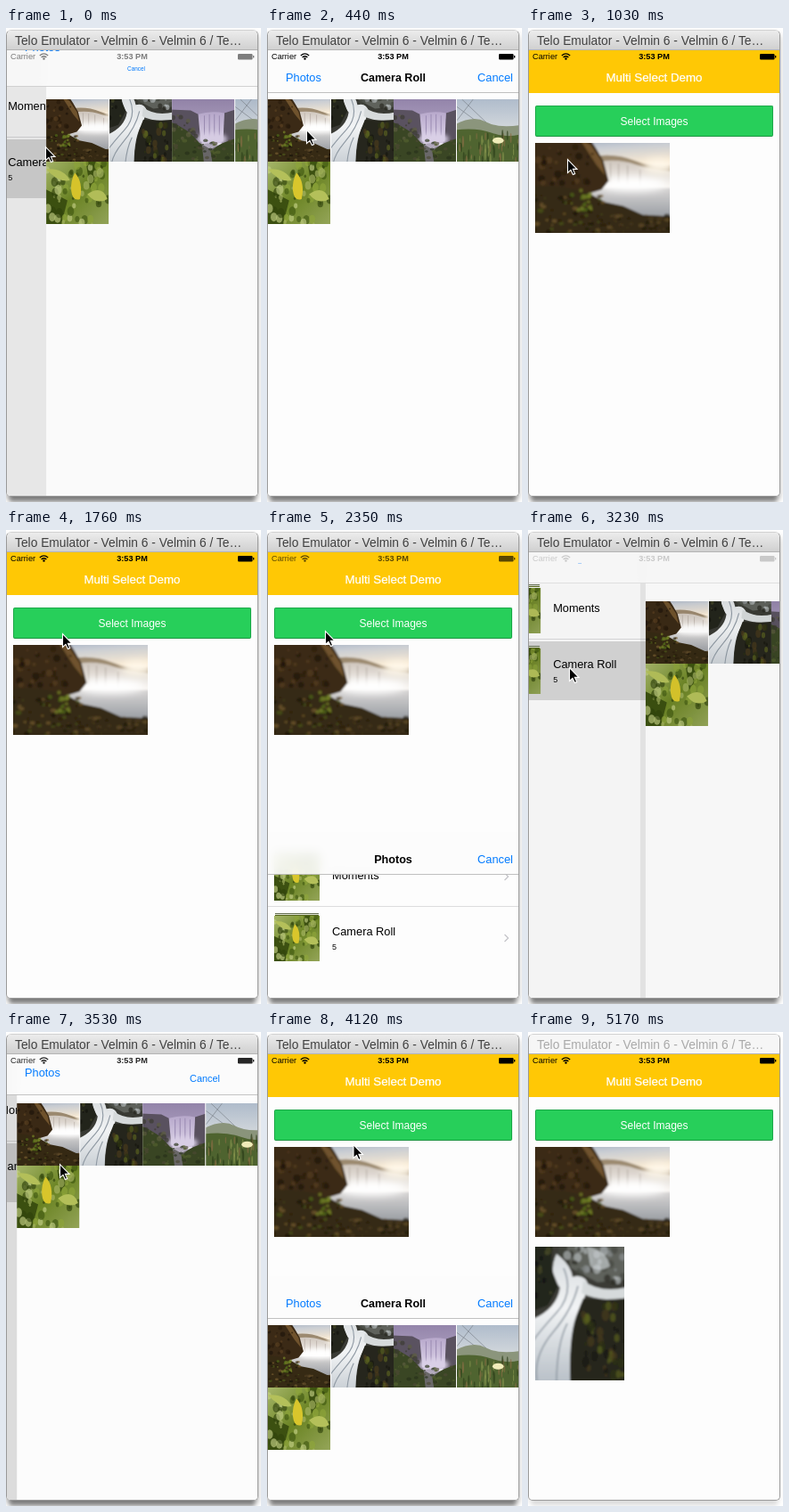
Animation, 286 px wide and 532 px high, one loop 6360 ms. Source, as an HTML page:

```html
<!DOCTYPE html>
<html lang="en">
<head>
<meta charset="utf-8">
<title>Multi select picker</title>
<style>
@property --y { syntax: "<length>"; inherits: true; initial-value: 0px; }
@property --cx { syntax: "<length>"; inherits: true; initial-value: 0px; }
@property --cy { syntax: "<length>"; inherits: true; initial-value: 0px; }
@property --push { syntax: "<number>"; inherits: true; initial-value: 0; }
@property --nav { syntax: "<number>"; inherits: true; initial-value: 1; }
@property --ink { syntax: "<number>"; inherits: true; initial-value: 1; }
@property --press { syntax: "<number>"; inherits: true; initial-value: 0; }
@property --one { syntax: "<number>"; inherits: true; initial-value: 0; }
@property --two { syntax: "<number>"; inherits: true; initial-value: 0; }
@property --active { syntax: "<number>"; inherits: true; initial-value: 1; }

/* Every value holds until the next stop that names it. */
@keyframes play {
  0% { --y: 0px; --push: .843; --nav: .5; --ink: .5; --press: 0; --one: 0; --two: 0; --active: 1; --cx: 44px; --cy: 133px; }
  2.2% { --push: .96; --nav: .85; --ink: .85; --cy: 124px; }
  4.55% { --push: 1; --nav: 1; --ink: 1; --cy: 116px; }
  6.91% { --cy: 114px; }
  11.63% { --y: 249px; }
  13.99% { --y: 440px; --cy: 130px; }
  16.19% { --y: 500px; --push: 0; --one: 1; --cy: 147px; }
  18.39% { --cy: 162px; }
  20.75% { --cx: 45px; --cy: 151px; }
  23.11% { --cx: 50px; --cy: 138px; }
  25.31% { --cx: 57px; --cy: 126px; }
  27.67% { --cx: 63px; --cy: 116px; }
  30.03% { --press: 1; --cx: 65px; --cy: 113px; }
  32.23% { --press: 0; }
  36.94% { --y: 314px; --ink: .65; }
  39.15% { --y: 100px; --ink: .85; }
  41.5% { --y: 20px; --ink: 1; --cx: 57px; --cy: 131px; }
  43.71% { --y: 0px; --cx: 48px; --cy: 150px; }
  46.06% { --cx: 46px; --cy: 154px; }
  50.78% { --push: .534; --nav: .1; --ink: .18; }
  52.98% { --push: .843; --nav: .5; --ink: .5; }
  55.34% { --push: .96; --nav: .85; --ink: .85; --cx: 60px; --cy: 148px; }
  57.7% { --push: 1; --nav: 1; --ink: 1; --cx: 82px; --cy: 135px; }
  60.2% { --cx: 96.5px; --cy: 126px; }
  64.77% { --y: 249px; }
  67.13% { --y: 440px; }
  69.49% { --y: 500px; }
  71.85% { --two: 1; }
  81.28% { --active: 0; }
}

html, body { margin: 0; width: 100%; height: 100%; overflow: hidden; background: #fff; }
#stage {
  position: absolute; left: 0; top: 0; width: 286px; height: 532px; overflow: hidden;
  font: 12.8px/20px "Liberation Sans", Arial, sans-serif; color: #000;
  animation: play 6360ms step-end infinite;
}
#stage div, #stage svg { position: absolute; white-space: nowrap; }
.full { inset: 0; }
.mid { left: 1px; width: 281px; text-align: center; }
.blue { color: #007aff; }
b { font-weight: 700; }

#window, #shadow { left: 0; top: 2px; width: 283px; height: 524px; border-radius: 6px 6px 5px 5px; }
#window {
  box-sizing: border-box; border: 1px solid #9a9a9a; border-top-color: #d2d2d2;
  background: #fdfdfd; overflow: hidden;
}
#shadow {
  box-shadow: 0 10px 5px -4px rgba(0, 0, 0, calc(.08 + var(--active) * .28)),
    0 4px 6px rgba(0, 0, 0, calc(.08 + var(--active) * .2));
}
#title {
  left: 0; top: 0; width: 281px; height: 21px; border-bottom: 1px solid #b4b4b4;
  background: linear-gradient(#ececec, #d0d0d0);
}
#fade { background: #f6f6f6; opacity: calc(1 - var(--active)); }
#name { left: 9px; top: 2px; font-size: 13.8px; color: #404040; opacity: calc(.42 + var(--active) * .58); }

#screen { clip-path: inset(25px 4px 7px 1px round 0 0 4px 4px); }
#head { left: 1px; top: 25px; width: 281px; height: 48px; background: #ffc805; }
#head + div { top: 46px; font-size: 13.3px; color: #fff; -webkit-text-stroke: .25px #fff; }
#button {
  left: 8px; top: 87px; width: 267px; height: 35px; box-sizing: border-box; border-radius: 2px;
  border: 1px solid #1fa84a; border-bottom-color: #1b9440; background: #27cf5a;
  font-size: 12px; line-height: 34px; text-align: center; color: #fff;
}
#button div { inset: 0; background: #000; opacity: calc(var(--press) * .16); }

#sheet { transform: translateY(var(--y)); clip-path: inset(25px 0 0); }
#list { background: #fdfdfd; transform: translateX(calc(var(--push) * -84px)); }
.row { left: 1px; width: 281px; height: 68px; }
.row .text { left: 72px; }
.rows { left: 0; top: calc(54px - var(--y) * .0446); width: 286px; height: 136px; }
.pick { left: -1px; top: 2px; width: 340px; height: 66px; background: #d9d9d9; opacity: calc(var(--push) * 50); }
.edge { left: 8px; top: 7px; width: 49px; height: 3px; background: linear-gradient(#8d9980, #2f3815 40%, #fff 45%, #55661c 70%); }
.arrow { left: 264px; top: 30px; }
#dim { background: #000; opacity: calc(var(--push) * var(--push) * var(--push) * var(--push) * .15); }
#grid { background: #fdfdfd; left: 1px; top: 0; width: 281px; height: 532px; transform: translateX(calc((1 - var(--push)) * 281px)); }
#strip { left: -6px; top: 0; width: 6px; height: 532px; background: #000; opacity: calc((.84 - var(--push)) * var(--push) * .42); }
#bar {
  left: 1px; top: 25px; width: 281px; height: calc(32px + var(--nav) * 15px);
  border-bottom: 1px solid rgba(0, 0, 0, calc(.08 + var(--nav) * .16));
  background: rgba(252, 252, 252, .9); backdrop-filter: blur(6px);
}
#veil { background: #000; opacity: calc((1 - var(--push)) * var(--push) * .1); }
.nav { top: 46px; }
#cancel {
  left: 216px; width: 80px; text-align: center;
  transform: translate(calc((var(--nav) - 1) * 220px), calc((var(--nav) - 1) * 20px)) scale(var(--nav));
}
#back { left: 21px; opacity: calc(var(--push) * 50); transform: translateY(calc((var(--nav) - 1) * 68px)); }
#photos { opacity: calc(1 - var(--push) * 50); font-size: 12.6px; }
#roll { opacity: calc((var(--push) - .98) * 50); font-size: 12.5px; }

#status { font-size: 9.2px; opacity: var(--ink); }
#status div { top: 22px; }
#cursor { left: 0; top: 0; transform: translate(var(--cx), var(--cy)); opacity: var(--active); overflow: visible; }
</style>
</head>
<body>
<svg width="0" height="0" style="position:absolute">
  <defs>
    <linearGradient id="dawn" x2=".2" y2="1"><stop stop-color="#8497b3"/><stop offset=".35" stop-color="#c9cdd3"/><stop offset=".7" stop-color="#f8e9d2"/></linearGradient>
    <linearGradient id="lake" x2="0" y2="1"><stop stop-color="#dfdcda"/><stop offset=".5" stop-color="#a3a6ab"/><stop offset="1" stop-color="#6d7479"/></linearGradient>
    <linearGradient id="foam" x2="0" y2="1"><stop stop-color="#cfc6bd"/><stop offset="1" stop-color="#fbf9f6"/></linearGradient>
    <linearGradient id="silk" x2="0" y2="1"><stop stop-color="#d6dadd"/><stop offset=".4" stop-color="#f2f4f5"/><stop offset="1" stop-color="#b4bcc4"/></linearGradient>
    <linearGradient id="dusk" x2="0" y2="1"><stop stop-color="#8f80a6"/><stop offset="1" stop-color="#b9accb"/></linearGradient>
    <linearGradient id="veilfall" x2="0" y2="1"><stop stop-color="#b8a9cc"/><stop offset="1" stop-color="#dcd3e8"/></linearGradient>
    <linearGradient id="haze" x2="0" y2="1"><stop stop-color="#a9b7c9"/><stop offset="1" stop-color="#dcdfe0"/></linearGradient>
    <linearGradient id="leaf" x2="1" y2="1"><stop stop-color="#b1bf76"/><stop offset=".5" stop-color="#6b8424"/><stop offset="1" stop-color="#9cab62"/></linearGradient>
    <filter id="soft"><feGaussianBlur stdDeviation=".9"/></filter>
    <filter id="mist" x="-.3" y="-.6" width="1.6" height="2.2"><feGaussianBlur stdDeviation="4"/></filter>

    <g id="falls" filter="url(#soft)">
      <path fill="url(#dawn)" d="M-9-9H159V45H-9Z"/>
      <path fill="url(#lake)" d="M-9 46H159V109H-9Z"/>
      <path fill="#9c8a70" d="M72 14Q92 12 112 20T159 24V34L110 28 72 30Z"/>
      <path fill="url(#foam)" d="M76 20Q96 18 112 24T159 32V50H72Z"/>
      <path stroke="#b3aaa2" d="M84 22V44M93 23V44M103 25V46M117 30V48"/>
      <ellipse cx="108" cy="46" rx="38" ry="8" fill="#fff" filter="url(#mist)"/>
      <ellipse cx="138" cy="26" rx="18" ry="8" fill="#fff8ea" filter="url(#mist)"/>
      <path fill="#3b2a16" d="M-9-9H58L68 6 76 20 82 42 74 52 40 62-9 60Z"/>
      <path fill="#70532d" d="M50-4L62 2 74 20 78 36 68 24Z"/>
      <path fill="#362a14" d="M-9 48Q30 46 58 55L78 66 98 70 120 80 159 82V109H-9Z"/>
      <g id="moss"/>
    </g>

    <g id="stream" filter="url(#soft)">
      <path fill="#3a3b35" d="M-9-9H109V159H-9Z"/>
      <path fill="#5f625c" d="M34-9H109V36L70 40 40 24Z"/>
      <g id="crags"/>
      <path fill="url(#silk)" d="M24 8Q40 20 42 34 56 30 60 44L52 66Q36 88 40 159H-9V84Q24 72 28 46 14 30 24 8Z"/>
      <path fill="#d6dadb" d="M54 38Q74 54 109 44V56Q76 64 52 52Z"/>
      <path fill="#c9ced2" d="M58 0Q80 4 84 22 70 30 62 22Z" opacity=".7"/>
      <path fill="#26261d" d="M54 58Q80 60 109 58V159H40Q36 96 54 58Z"/>
      <path fill="none" stroke="#8f99a3" stroke-width="1.600" d="M32 24Q44 52 24 74T-4 108M48 44Q42 70 20 96T2 150M36 86Q24 110 24 154"/>
      <path fill="#23251c" d="M-9-9H20L18 24 26 44 14 66-9 74Z"/>
      <g id="rock"/>
    </g>

    <g id="violet" filter="url(#soft)">
      <path fill="url(#dusk)" d="M-9-9H109V70H-9Z"/>
      <path fill="#5a5260" d="M-9 16L30 18 46 26 48 74H-9ZM84 22L109 14V84H78Z"/>
      <path fill="url(#veilfall)" d="M42 24Q62 18 84 22L82 68H46Z"/>
      <path stroke="#9c8db4" stroke-width="1.500" d="M52 26V58M60 24V60M68 24V60M76 26V58"/>
      <ellipse cx="64" cy="64" rx="24" ry="10" fill="#d9cfe6" filter="url(#mist)"/>
      <path fill="#3a4624" d="M-9 34Q24 44 44 70L62 80 82 70 109 60V109H-9Z"/>
      <path fill="#8a7f98" d="M48 72Q62 68 74 74L62 84 66 109H52Z" opacity=".6"/>
      <g id="slope"/>
    </g>

    <g id="dune" filter="url(#soft)">
      <path fill="url(#haze)" d="M-9-9H109V60H-9Z"/>
      <path stroke="#7d858d" d="M0 12L35 38M8 0L50 40M0 34L26 0"/>
      <path fill="#8b957c" d="M-9 44Q24 24 46 36T109 40V109H-9Z"/>
      <path fill="#4f6430" d="M-9 50Q30 44 56 54T109 54V109H-9Z"/>
      <g id="grass"/>
      <ellipse cx="66" cy="66" rx="9" ry="5" fill="#f1edba"/>
    </g>

    <g id="leaves" filter="url(#soft)">
      <path fill="url(#leaf)" d="M-9-9H109V109H-9Z"/>
      <path fill="#3c5011" d="M-9 40L34 62 22 109H-9ZM62-9L92 8 70 42Z"/>
      <g id="glints"/>
      <path fill="#b4c05a" d="M0 12Q28 10 38 30 20 34 0 12ZM66 52Q90 36 98 60 80 70 66 52Z"/>
      <path fill="#d9c62c" d="M46 18Q60 34 54 60 42 64 40 46 39 30 46 18Z"/>
    </g>
  </defs>
</svg>

<div id="stage">
  <div id="shadow"></div>
  <div id="window">
    <div id="title">
      <div id="fade" class="full"></div>
      <div id="name">Telo Emulator - Velmin 6 - Velmin 6 / Te…</div>
    </div>
  </div>

  <div id="screen" class="full">
    <div id="head"></div>
    <div class="mid">Multi Select Demo</div>
    <div id="button">Select Images<div></div></div>
    <svg style="left:8px;top:129px;opacity:var(--one)" width="151" height="101" viewBox="0 0 150 100"><use href="#falls"/></svg>
    <svg style="left:8px;top:241px;opacity:var(--two)" width="100" height="150" viewBox="0 0 100 150"><use href="#stream"/></svg>

    <div id="sheet" class="full">
      <div id="list" class="full">
        <div class="rows">
          <div class="row" style="top:0">
            <div class="edge"></div>
            <svg style="left:7px;top:11px" width="51" height="51" viewBox="0 0 100 100"><use href="#leaves"/></svg>
            <div class="text" style="top:24px">Moments</div>
            <svg class="arrow" width="8" height="10"><path d="M1.500 1L5.500 5 1.500 9" fill="none" stroke="#c4c4c9" stroke-width="1.300"/></svg>
          </div>
          <div class="row" style="top:68px;border-top:1px solid #dcdcde">
            <div class="pick"></div>
            <div class="edge"></div>
            <svg style="left:7px;top:10px" width="51" height="51" viewBox="0 0 100 100"><use href="#leaves"/></svg>
            <div class="text" style="top:18px">Camera Roll</div>
            <div class="text" style="top:35px;font-size:9px">5</div>
            <svg class="arrow" width="8" height="10"><path d="M1.500 1L5.500 5 1.500 9" fill="none" stroke="#c4c4c9" stroke-width="1.300"/></svg>
          </div>
        </div>
      </div>
      <div id="dim" class="full"></div>
      <div id="grid">
        <div id="strip"></div>
        <svg style="left:0;top:79.500px" width="70" height="70" viewBox="25 0 100 100"><use href="#falls"/></svg>
        <svg style="left:70.500px;top:79.500px" width="70" height="70" viewBox="0 25 100 100"><use href="#stream"/></svg>
        <svg style="left:141px;top:79.500px" width="70" height="70" viewBox="0 0 100 100"><use href="#violet"/></svg>
        <svg style="left:211.500px;top:79.500px" width="70" height="70" viewBox="0 0 100 100"><use href="#dune"/></svg>
        <svg style="left:0;top:150px" width="70" height="70" viewBox="0 0 100 100"><use href="#leaves"/></svg>
      </div>
      <div id="bar"></div>
      <div id="back" class="nav blue">Photos</div>
      <div id="photos" class="nav mid"><b>Photos</b></div>
      <div id="roll" class="nav mid"><b>Camera Roll</b></div>
      <div id="cancel" class="nav blue">Cancel</div>
      <div id="veil" class="full"></div>
    </div>

    <div id="status" class="full">
      <div style="left:5px">Carrier</div>
      <svg style="left:37px;top:28px" width="11" height="8" fill="none" stroke="#000" stroke-width="1.300">
        <path d="M.8 3Q5.500-1.200 10.200 3M2.600 5Q5.500 2.400 8.400 5"/><circle cx="5.500" cy="6.500" r=".6"/>
      </svg>
      <div class="mid"><b>3:53 PM</b></div>
      <svg style="left:260px;top:29px" width="19" height="7"><rect width="16.500" height="6.500" rx="1.200"/><rect x="17" y="2" width="1.300" height="2.500"/></svg>
    </div>
  </div>

  <svg id="cursor" width="12" height="19">
    <path d="M.5 .5V15.500L4 12.300 6.400 17.600 8.700 16.600 6.400 11.400H11Z" fill="#000" stroke="#fff" stroke-width="1.100"/>
  </svg>
</div>

<script>
let seed = 7;
const rand = () => (seed = (seed * 16807) % 2147483647) / 2147483647;

// Scatter small blots of colour over a box, stretched by tall.
function scatter(id, count, [x, y, w, h], colors, size, tall = 1) {
  const group = document.getElementById(id);
  for (let i = 0; i < count; i++) {
    const blot = document.createElementNS("http://www.w3.org/2000/svg", "ellipse");
    const r = size * (.4 + rand());
    const set = { cx: x + rand() * w, cy: y + rand() * h, rx: r, ry: r * tall, fill: colors[i % colors.length], opacity: .65 };
    for (const key in set) blot.setAttribute(key, set[key]);
    group.append(blot);
  }
}

scatter("moss", 36, [0, 2, 64, 46], ["#1d140a", "#5c4222", "#2a1c0d"], 3);
scatter("moss", 70, [0, 58, 80, 42], ["#7a6031", "#171207", "#4f5a1c", "#2a1f0c"], 2.4, .7);
scatter("moss", 40, [80, 80, 70, 20], ["#66502c", "#1c160b", "#4a3a20"], 2.4, .7);
scatter("moss", 22, [40, 52, 26, 26], ["#7d8c2a", "#55701a"], 2);
scatter("crags", 40, [28, 0, 72, 40], ["#26261f", "#8d9294", "#44463f", "#b9bec0"], 3.5, 1.2);
scatter("rock", 46, [54, 66, 46, 84], ["#5c6420", "#15150e", "#4b3c1b", "#2d3212"], 3, 1.6);
scatter("rock", 14, [0, 2, 18, 56], ["#4a4d2a", "#12130e"], 2.6, 1.4);
scatter("slope", 44, [0, 66, 100, 34], ["#26301a", "#54632f", "#4d4a34"], 3, .7);
scatter("slope", 20, [0, 24, 40, 40], ["#3a3a30", "#5d6040"], 3);
scatter("grass", 60, [0, 58, 100, 42], ["#2b3c18", "#8a9850", "#8a6d45"], 1.2, 6);
scatter("glints", 60, [0, 0, 100, 100], ["#c3cf85", "#3f5711", "#8fa63a", "#2f420c", "#a9b766"], 4.2, 1.4);
</script>
</body>
</html>
```
